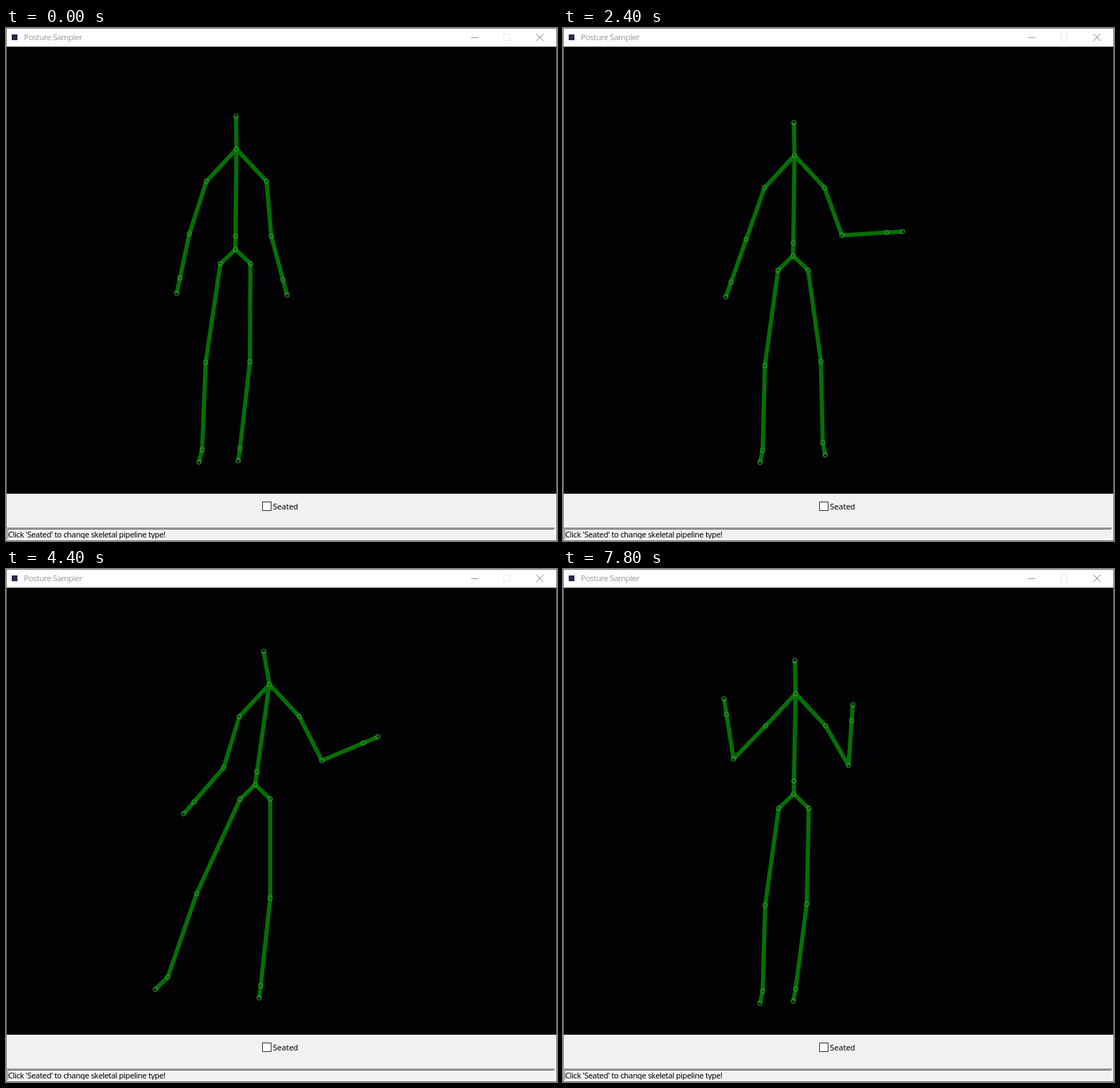
Animation, 770 px wide and 716 px high, one loop 8000 ms. Source, as an HTML page:

```html
<!DOCTYPE html>
<html lang="en">
<head>
<meta charset="utf-8">
<title>Posture Sampler</title>
<style>
  html, body { margin: 0; width: 100%; height: 100%; overflow: hidden; background: #f1f1f3; }
  svg { display: block; }
  .ui { font: 11px "Noto Sans", "Open Sans", sans-serif; fill: #000; }
  .title { font: 11.5px "Open Sans", "Noto Sans", sans-serif; letter-spacing: -.5px; fill: #999; }
  .status { letter-spacing: -.34px; }
</style>
</head>
<body>
<svg width="770" height="716" viewBox="0 0 770 716">
  <clipPath id="statusClip"><rect x="2" y="699" width="764" height="14"/></clipPath>
  <rect width="770" height="716" fill="#f1f1f3"/>
  <rect width="770" height="26" fill="#fff"/>
  <rect x="1" y="26" width="768" height="624" fill="#020204"/>
  <rect x=".5" y=".5" width="769" height="715" fill="none" stroke="#777"/>

  <rect x="8" y="9" width="8" height="8" fill="#35264a"/>
  <text class="title" x="25" y="17">Posture Sampler</text>
  <g fill="none" stroke="#999">
    <path d="M650 13.5h10"/>
    <rect x="695.5" y="8.5" width="9" height="9" stroke="#ececec"/>
    <path d="M741 8l10 10M751 8l-10 10" stroke="#8c8c8c"/>
  </g>

  <path id="bones" fill="none" stroke="#047004" stroke-width="5.8"/>
  <path id="rings" fill="none" stroke="#38a838"/>

  <rect x="358.5" y="661.5" width="12" height="12" fill="#fff" stroke="#333"/>
  <text class="ui" x="373" y="672">Seated</text>

  <g fill="none">
    <path d="M1 698h766" stroke="#a0a0a0" stroke-width="2"/>
    <path d="M2.5 714V699.5H766" stroke="#696969"/>
    <path d="M2 713.5h764.5V699" stroke="#fff"/>
  </g>
  <text class="ui status" x="3" y="711" clip-path="url(#statusClip)">Click 'Seated' to change skeletal pipeline type!</text>
</svg>
<script>
const LOOP = 8000, STEP = 200, FLOOR = 590, RING = 3.1;
const bones = document.getElementById('bones');
const rings = document.getElementById('rings');

// Arms are [upper, fore] angles in degrees, from hanging (0) outward to raised (180).
const poses = [
  { t: 0,    neck: [322, 169], feet: [274, 327], left: [18, 12],  right: [5, 15] },
  { t: 1600, neck: [334, 177], feet: [279, 339], left: [23, 5],   right: [26, 148] },
  { t: 3200, neck: [313, 179], feet: [279, 387], left: [16, 34],  right: [14, 39] },
  { t: 4400, neck: [368, 161], feet: [226, 356], left: [17, 41],  right: [27, 113] },
  { t: 5400, neck: [318, 171], feet: [279, 346], left: [44, 154], right: [10, 115] },
  { t: 6600, neck: [337, 169], feet: [200, 327], left: [16, 115], right: [43, 157] },
  { t: 7800, neck: [325, 174], feet: [279, 325], left: [44, 171], right: [30, 176] },
];

const mix = (a, b, u) => a + (b - a) * u;
const mixAll = (a, b, u) => a.map((v, i) => mix(v, b[i], u));
const add = ([x, y], dx, dy) => [x + dx, y + dy];

function poseAt(t) {
  const next = Math.max(1, poses.findIndex(p => p.t >= t));
  const a = poses[next - 1], b = poses[next];
  const u = (t - a.t) / (b.t - a.t);
  const pose = {};
  for (const part of ['neck', 'feet', 'left', 'right']) pose[part] = mixAll(a[part], b[part], u);
  return pose;
}

// side is -1 for the left of the picture, 1 for the right
function arm(neck, side, [upper, fore]) {
  const reach = (p, length, deg) => {
    const a = deg * Math.PI / 180;
    return add(p, side * length * Math.sin(a), length * Math.cos(a));
  };
  const shoulder = add(neck, side * 42, 45);
  const elbow = reach(shoulder, 78 - fore * .08, upper);
  const wrist = reach(elbow, 63, fore);
  return [neck, shoulder, elbow, wrist, reach(wrist, 22, fore)];
}

// A foot that steps aside also moves back, so it stands higher in the picture.
function leg(pelvis, side, x) {
  const hip = add(pelvis, side * 21, 20);
  const ankle = [x, FLOOR - Math.abs(x - 306 - side * 29) * .4];
  const knee = add(mixAll(hip, ankle, .53), side * 7, 0);
  const foot = add(ankle, (x - hip[0]) * .17, 17);
  return [pelvis, hip, knee, ankle, foot];
}

function skeleton({ neck, feet, left, right }) {
  const pelvis = [mix(326, neck[0] - 5, .6), neck[1] + 140];
  const head = add(neck, (pelvis[0] - neck[0]) * .4, -46);
  return [
    [head, neck, mixAll(neck, pelvis, .87), pelvis],
    arm(neck, -1, left), arm(neck, 1, right),
    leg(pelvis, -1, feet[0]), leg(pelvis, 1, feet[1]),
  ];
}

const at = p => p.map(v => v.toFixed(2)).join(' ');
const circle = p =>
  `M${at(add(p, -RING, 0))}a${RING} ${RING} 0 1 0 ${2 * RING} 0a${RING} ${RING} 0 1 0 ${-2 * RING} 0`;

function render(ms) {
  const chains = skeleton(poseAt(Math.floor(ms % LOOP / STEP) * STEP));
  const joints = new Set(chains.flat());
  bones.setAttribute('d', chains.flatMap(c => c.slice(1).map((p, i) => `M${at(c[i])}L${at(p)}`)).join(''));
  rings.setAttribute('d', [...joints].map(circle).join(''));
}

const start = performance.now();
function tick() {
  render(performance.now() - start);
  requestAnimationFrame(tick);
}
tick();
</script>
</body>
</html>
```
